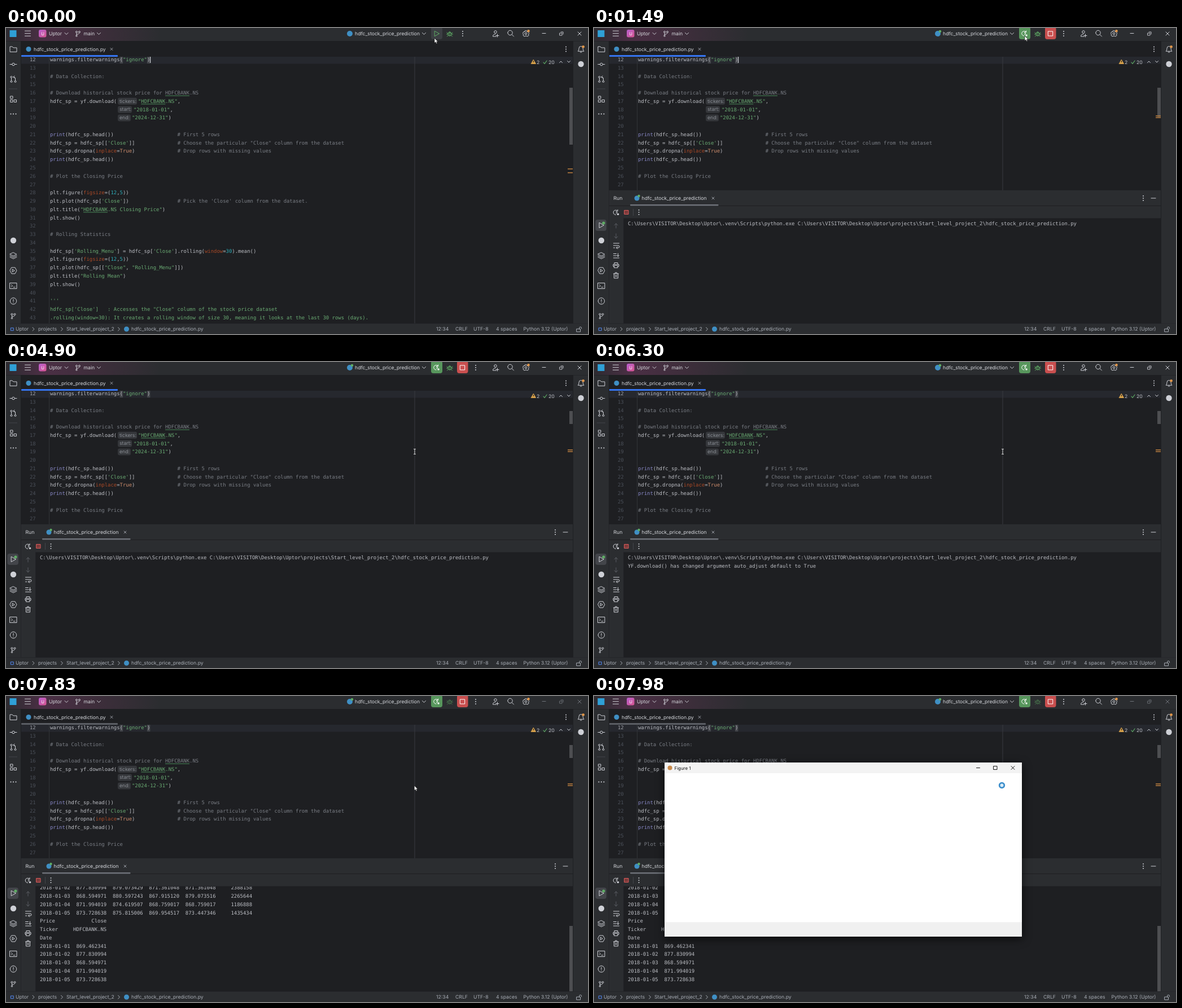
Write an HTML page that moves like this. It is 1031 px wide and 543 px high and loops after 8 s.

```html
<!DOCTYPE html>
<html lang="en">
<head>
<meta charset="utf-8">
<title>Editor run</title>
<style>
  html, body { margin: 0; width: 100%; height: 100%; overflow: hidden; background: #1e1f22; }
  svg { display: block; width: 100vw; height: 100vh; }
  text { font: 8.7px Inter, sans-serif; white-space: pre; text-rendering: geometricPrecision; }
  .mono { font: 8.93px "DejaVu Sans Mono", monospace; }
</style>
</head>
<body>
<svg id="stage" viewBox="0 0 1031 543" xmlns="http://www.w3.org/2000/svg"></svg>
<script>
const LOOP = 8000, COL = 5.376, ROW = 14.77;
const PANEL = '#2b2d30', EDITOR = '#1e1f22', ICON = '#ced0d6', TEXT = '#d5d7dc', DIM = '#6f737a';
const GREEN = '#57965c', ORANGE = '#e0964a', PYTHON = '#3f8fc4';

// Drawing helpers; all return SVG markup.
const rect = (x, y, w, h, fill, more = '') => `<rect x="${x}" y="${y}" width="${w}" height="${h}" fill="${fill}" ${more}/>`;
const dot = (x, y, r, fill) => `<circle cx="${x}" cy="${y}" r="${r}" fill="${fill}"/>`;
const label = (x, y, s, fill = TEXT, more = '') => `<text x="${x}" y="${y}" fill="${fill}" ${more}>${s}</text>`;
const mono = (x, y, s, fill = '#bcbec4') => label(x, y, s, fill, 'class="mono"');
const icon = (x, y, d, color = ICON, fill = 'none', width = 1) =>
  `<path transform="translate(${x} ${y})" d="${d}" stroke="${color}" fill="${fill}" stroke-width="${width}" stroke-linecap="round" stroke-linejoin="round"/>`;
const ring = (x, y, r) => `M${x - r} ${y}a${r} ${r} 0 1 0 ${2 * r} 0a${r} ${r} 0 1 0 ${-2 * r} 0`;
const dots = (x, y) => [-4, 0, 4].map(d => dot(x, y + d, 1, ICON)).join('');
const during = (from, to, body) => `<g data-from="${from}" data-to="${to}">${body}</g>`;

const CHEVRON = 'M-3-1.5L0 1.5 3-1.5', NEXT = 'M-1.5-3L1.5 0-1.5 3', CROSS = 'M-2-2L2 2M2-2L-2 2';
const BIGCROSS = 'M-3-3L3 3M3-3L-3 3', PLAY = 'M-3.5-4.5L4.5 0-3.5 4.5z', BOX = 'M-3-3h6v6h-6z';
const BRANCH = ring(-2.5, -3, 1.5) + ring(2.5, -3, 1.5) + ring(-2.5, 4, 1.2) + 'M-2.5-1.5V2.8M2.5-1.5Q2.5 1-2.5 1.5';
const RERUN = 'M2-3.5A4.2 4.2 0 1 0-.5 4M3-5V-2.5H.5M0-1.5L2.5 0 0 1.5';
const BUG = ring(0, 1, 3) + 'M-2-2Q0-5 2-2M0-1.5V4M-5-2L-3 0M5-2L3 0M-5.5 1h2M5.5 1h-2M-4.5 5L-2.5 3M4.5 5L2.5 3';

const CODE = `warnings.filterwarnings("ignore")

# Data Collection:

# Download historical stock price for HDFCBANK.NS
hdfc_sp = yf.download(



print(hdfc_sp.head())                     # First 5 rows
hdfc_sp = hdfc_sp[['Close']]              # Choose the particular "Close" column from the dataset
hdfc_sp.dropna(inplace=True)              # Drop rows with missing values
print(hdfc_sp.head())

# Plot the Closing Price

plt.figure(figsize=(12,5))
plt.plot(hdfc_sp['Close'])                # Pick the 'Close' column from the dataset.
plt.title("HDFCBANK.NS Closing Price")
plt.show()

# Rolling Statistics

hdfc_sp['Rolling_Menu'] = hdfc_sp['Close'].rolling(window=30).mean()
plt.figure(figsize=(12,5))
plt.plot(hdfc_sp[["Close", "Rolling_Menu"]])
plt.title("Rolling Mean")
plt.show()

'''
hdfc_sp['Close']   : Accesses the "Close" column of the stock price dataset
.rolling(window=30): It creates a rolling window of size 30, meaning it looks at the last 30 rows (days).`.split('\n');

const TOKEN = /(#.*)|("[^"]*"|'[^']*')|\b(figsize|inplace|window)(?==)|\b(True)\b|\b(print)\b|\b(\d+)\b/g;
const TOKEN_COLORS = ['#7a7e85', '#6aab73', '#aa4926', '#cf8e6d', '#8888c6', '#2aacb8'];
const paint = s => s.replace(TOKEN, (word, ...groups) =>
  `<tspan fill="${TOKEN_COLORS[groups.findIndex(Boolean)]}">${word}</tspan>`);

const baseline = line => 59 + (line - 12) * ROW;
const hint = (line, w, name, next, code) =>
  rect(198, baseline(line) - 9, w, 12.2, '#35373b', 'rx="3"') +
  label(201, baseline(line) - .2, name, '#8b8f96') + mono(next, baseline(line), paint(code));
const typo = (x, line) => rect(x, baseline(line) + 1.6, 8 * COL, 1, '#4b8a5a');

function editor() {
  const lines = CODE.map((s, i) => {
    const n = i + 12;
    return mono(42, baseline(n), n, n == 12 ? '#a1a3ab' : '#4b5059') +
      mono(78, baseline(n), n > 40 ? s : paint(s), n > 40 ? '#6aab73' : undefined);
  }).join('');
  return rect(26, 23, 978, 501, EDITOR) + rect(27, 51, 977, 12.5, '#26282e') +
    rect(76, 51, 1, 473, '#313438') + rect(723.5, 51, 1, 473, '#393b40') +
    rect(201.7, 51, COL, 12, '#43454a') + rect(250, 51, COL, 12, '#43454a') + lines +
    hint(17, 34, 'tickers:', 234, '"HDFCBANK.NS",') +
    hint(18, 25, 'start:', 226, '"2018-01-01",') +
    hint(19, 23, 'end:', 223, '"2024-12-31")') +
    typo(282, 16) + typo(239.3, 17) + typo(137, 30) +
    `<rect id="caret" x="255" y="51" width="1.2" height="11" fill="${ICON}"/>` +
    icon(934.5, 60, 'M0-3.5L4 3.5H-4z', '#d6a04a', '#d6a04a') + rect(934, 58, 1, 3, EDITOR) +
    label(940, 63.5, '2', '#bcbec4') + icon(955, 61, 'M-3 0L-1 2.5 3-3', '#5fad65', 'none', 1.2) +
    label(961, 63.5, '20', '#bcbec4') + icon(983, 60, 'M-2.5 1.5L0-1 2.5 1.5') + icon(997, 60, 'M-2.5-1.5L0 1 2.5-1.5') +
    dot(40, 37.5, 4.5, PYTHON) + label(49, 41, 'hdfc_stock_price_prediction.py') + icon(187, 37.5, CROSS, '#9da0a8') +
    during(0, 7830, rect(27, 48, 171, 3, '#3574f0', 'rx="1"')) +
    during(7830, LOOP, rect(27, 48, 171, 3, '#5a5d63', 'rx="1"')) + dots(992, 37.5);
}

const scrollbar = (from, to, y, h, marks) => during(from, to,
  rect(998, y, 6, h, '#4d4e51') + marks.map(m => rect(995, m, 9, 1.6, '#b47a3e')).join(''));

function titleBar() {
  const controls = color => icon(786, 10, BUG, color == ICON ? '#5fad65' : '#466f4a') +
    icon(953, 9.5, 'M-3 0H3', color) + icon(984, 10, 'M-3-1h4v4h-4zM-1-3h4v4', color, 'none', .9) + icon(1016, 10, BIGCROSS, color);
  return `<defs><linearGradient id="tint" gradientUnits="userSpaceOnUse" x1="0" x2="275">
      <stop stop-color="#2d2b30"/><stop offset=".24" stop-color="#4b2f45"/><stop offset=".55" stop-color="#3f2e3c"/><stop offset="1" stop-color="${PANEL}"/>
    </linearGradient><linearGradient id="badge" x2="1" y2="1"><stop stop-color="#b75fd0"/><stop offset="1" stop-color="#d8568f"/></linearGradient></defs>` +
    rect(0, 0, 1031, 23, PANEL) + rect(0, 0, 275, 23, 'url(#tint)') + rect(0, 23, 1031, .7, EDITOR) +
    rect(6.5, 4, 12, 12, '#2f9fd6') + icon(38.5, 9.7, 'M-5-4.5H5M-5 0H5M-5 4.5H5') +
    rect(58, 3, 13.5, 13.5, 'url(#badge)', 'rx="3"') + label(62.3, 12.6, 'U', '#fff', 'style="font-size:7.6px"') +
    label(76, 13, 'Uptor') + icon(107, 10, CHEVRON) + icon(127.5, 10, BRANCH, ICON, 'none', .9) +
    label(137.5, 13, 'main') + icon(164.5, 10, CHEVRON) +
    dot(609, 10, 5, PYTHON) + label(618, 13, 'hdfc_stock_price_prediction') + icon(740.5, 10, CHEVRON) +
    during(0, 1490, rect(753, -2, 20, 22, '#3c3f43', 'rx="4"') + icon(763, 10, PLAY, '#5fad65') + dots(809, 10)) +
    during(1490, LOOP, dot(613, 6, 2.3, '#5fad65') + rect(753, -2, 20, 22, GREEN, 'rx="4"') +
      icon(762.5, 10, RERUN, '#fff') + dot(766, 13, 1.8, '#e4efe5') +
      rect(799, -2, 19.5, 22, '#c94f4f', 'rx="4"') + icon(808.7, 10, 'M-4-4h8v8h-8z', '#fff') + dots(832, 10)) +
    during(0, 7830, controls(ICON)) + during(7830, LOOP, controls(DIM)) +
    icon(867.5, 10, ring(-.5, -3, 2.3) + 'M1 5H-5Q-5 .8-.5.8M3 1v5M.5 3.5h5') +
    icon(894, 9.5, ring(-1, -1, 4.2) + 'M2 2L5.5 5.5') +
    icon(921, 10, ring(0, 0, 1.8) + 'M-1.5-5h3l.6 1.7 2.3.3 1.2 2.3L4.5 1l.6 2-2 2-2-.8H-1l-2 .8-2-2 .5-2-1-1.8 1.2-2.3 2.2-.3z') + dot(925.5, 5.2, 2.3, ORANGE);
}

function sideBars() {
  return rect(0, 23.5, 26, 501, PANEL) + rect(1005, 23.5, 26, 501, PANEL) +
    icon(13, 37.5, 'M-6 4.5V-4.5H-2L0-2.5H6V4.5z') +
    icon(13, 64.5, ring(0, 0, 2.3) + 'M-6 0h3.5M2.5 0H6') +
    icon(13, 91, ring(-3.5, -4, 1.5) + ring(-3.5, 4, 1.5) + ring(3.5, 4, 1.5) + 'M-3.5-2.3V2.3M3.5 2.3V-2Q3.5-4 0-4M2-6L0-4 2-2') +
    rect(5, 107.5, 15, 1, '#43454a') +
    icon(13, 126, 'M-5-5h4v4h-4zM-5 1.5h4v4h-4zM1.5 1.5h4v4h-4z') +
    [8.5, 13, 17.5].map(x => dot(x, 152.5, 1.1, ICON)).join('') +
    dot(13, 377, 5.2, ICON) +
    icon(13, 404, 'M0-5.5L6-2.5 0 .5-6-2.5zM-6 0L0 3 6 0M-6 2.5L0 5.5 6 2.5') +
    icon(13, 430.5, 'M-3-5.5H3L6 0 3 5.5H-3L-6 0zM-1.5-2.3L2.3 0-1.5 2.3z') +
    icon(13, 457.5, 'M-6-5H6V5H-6zM-3.5-2L-1.5 0-3.5 2M0 2.5h3') +
    icon(13, 484.5, ring(0, 0, 5.7) + 'M0-3V.8M0 2.8V3') + icon(13, 511, BRANCH) +
    icon(1018.5, 37.5, 'M-5 3.5Q-3.5 2-3.5-1.5A3.5 3.5 0 0 1 3.5-1.5Q3.5 2 5 3.5zM-1.3 5.5H1.3') + dot(1022.5, 33.3, 2.4, ORANGE) +
    dot(1018.5, 64, 5.2, ICON);
}

function statusBar() {
  const gray = '#a8adb5';
  const items = [[17, 'Uptor'], [57, 'projects'], [107, 'Start_level_project_2'], [222, 'hdfc_stock_price_prediction.py'],
    [762, '12:34'], [796, 'CRLF'], [828, 'UTF-8'], [868, '4 spaces'], [916.5, 'Python 3.12 (Uptor)']];
  return rect(0, 524.5, 1031, 19, PANEL) + icon(11, 534.5, 'M-2.3-2.3h4.6v4.6h-4.6z', '#548af7') +
    items.map(([x, s]) => label(x, 537.3, s, gray)).join('') +
    [48.5, 99, 200].map(x => icon(x, 534.3, NEXT, gray)).join('') + dot(213.5, 534.3, 4.5, PYTHON) +
    icon(1015, 535, 'M-4-1H2.5V4H-4zM.5-1V-2.5A2 2 0 0 1 4.5-2.5V-1.5', gray);
}

const HOME = 'C:\\Users\\VISITOR\\Desktop\\Uptor\\';
const COMMAND = `${HOME}.venv\\Scripts\\python.exe ${HOME}projects\\Start_level_project_2\\hdfc_stock_price_prediction.py`;
const OUTPUT = `2018-01-02  877.830994  879.073429  871.361048  871.361048     2388158
2018-01-03  868.594971  880.597243  867.915120  879.073516     2265644
2018-01-04  871.994019  874.619507  868.759017  868.759017     1186888
2018-01-05  873.728638  875.815006  869.954517  873.447346     1435434
Price            Close
Ticker     HDFCBANK.NS
Date
2018-01-01  869.462341
2018-01-02  877.830994
2018-01-03  868.594971
2018-01-04  871.994019
2018-01-05  873.728638`.split('\n');

function runPanel() {
  const print = (y, lines) => lines.map((s, i) => mono(60, y + i * ROW, s)).join('');
  return during(1490, LOOP,
    rect(26.5, 288, 977.5, 50, PANEL) + rect(26.5, 338, 26, 186, PANEL) + rect(52.5, 338, 951.5, 186, EDITOR) +
    rect(26.5, 315, 977.5, 1, EDITOR) + rect(64, 313, 156.5, 2.5, DIM, 'rx="1"') +
    during(1490, 6300, print(350.3, [COMMAND])) +
    during(6300, 7750, print(350.3, [COMMAND, 'YF.download() has changed argument auto_adjust default to True'])) +
    during(7750, LOOP, print(343.3, OUTPUT) + rect(998, 408, 6, 116, '#4d4e51')) +
    rect(52.5, 316, 951.5, 22, PANEL) + rect(52.5, 337.5, 951.5, .8, EDITOR) +
    label(34.5, 305, 'Run', TEXT, 'font-weight="600"') + dot(76, 302, 4.5, PYTHON) + dot(79.5, 298, 2.2, '#5fad65') +
    label(84.5, 305, 'hdfc_stock_price_prediction') + icon(211, 302, CROSS, '#9da0a8') +
    dots(973, 302) + icon(991, 302, 'M-4 0H4') +
    icon(39, 327.5, RERUN) + dot(42.5, 330.5, 1.8, ICON) + icon(57.5, 327, 'M-3.5-3.5h7v7h-7z', '#db5c5c', '#7c3b3b') +
    rect(69, 321, 1, 12, '#43454a') + dots(79.5, 327) +
    icon(39, 351, 'M0 4V-4M-3-1L0-4 3-1', '#5a5d63') + icon(39, 369, 'M0-4V4M-3 1L0 4 3 1', '#5a5d63') +
    icon(39.5, 386, 'M-5-4H5M-5 0H3.5A2 2 0 0 1 3.5 4H0M2 2L0 4 2 6M-5 4h2.5') +
    icon(39.5, 404, 'M-5-3.5H0M-5 0H0M-5 4H5M3-4V1.5M1-.5L3 1.5 5-.5') +
    icon(39, 421, 'M-3-1.5V-4.5H3V-1.5M-3 2H-5V-1.5H5V2H3M-3 .5H3V4.5H-3z') +
    icon(39, 439, 'M-4.5-3H4.5M-1.5-3V-5H1.5V-3M-3.5-3V5H3.5V-3M-1-.5V2.5M1-.5V2.5') +
    rect(2.5, 340, 19.5, 20, '#43454a', 'rx="4"') + icon(13, 350, PLAY) + dot(17, 346, 2.6, '#5fad65'));
}

function figureWindow() {
  const frame = rect(0, 0, 633, 309, '#f3f3f3') + dot(9.5, 9.5, 4, '#c98a4b') + label(17.5, 12.9, 'Figure 1', '#111', 'style="font-size:7.9px"') +
    icon(555.5, 9.5, 'M-3 0H3', '#111') + icon(586, 9.5, BOX, '#111') + icon(617, 9.5, BIGCROSS, '#111');
  return during(7920, 7980, `<g transform="translate(125 120) scale(.953)" opacity=".69">${frame}</g>`) +
    during(7980, LOOP, `<g transform="translate(125 118)" style="filter:drop-shadow(0 4px 8px #000a)">${frame}` +
      rect(0, 19, 633, 264.5, '#fff') + rect(0, 283.5, 633, 25.5, '#f0f0f0') + '</g>');
}

const pointers = '<g id="arrow"><path d="M0 0V8.6L2 6.8 3.4 9.8 4.9 9.1 3.5 6.2H6.1z" fill="#fff" stroke="#111" stroke-width=".6"/></g>' +
  `<g id="beam">${icon(0, 0, 'M-1.5-4.5H1.5M0-4.5V4.5M-1.5 4.5H1.5', '#e8e8e8', 'none', .9)}</g>` +
  '<g id="busy"><circle r="4.3" fill="#d9ecf8" stroke="#3d8fcc" stroke-width="2.8"/></g>';

const stage = document.getElementById('stage');
stage.innerHTML = rect(0, 0, 1031, 543, EDITOR) + editor() +
  scrollbar(0, 1490, 106, 101, [249.3, 256]) + scrollbar(1490, 2100, 106, 52, [155.2, 158.2]) + scrollbar(2100, LOOP, 87, 23, [155.2, 158.2]) +
  titleBar() + sideBars() + runPanel() + statusBar() + figureWindow() + pointers;

const timed = [...stage.querySelectorAll('[data-from]')];
const show = (el, visible) => { el.style.display = visible ? '' : 'none'; };
const [caret, arrow, beam, busy] = ['caret', 'arrow', 'beam', 'busy'].map(id => document.getElementById(id));
const CARET_FLIPS = [490, 950, 1880, 2405, 2890, 3420, 3890, 4420, 4900, 5420, 5880, 6380, 6880, 7410, 7830];

// Share of a move done in equal time steps, eased at both ends.
function stepped(t, from, to, steps) {
  if (t < from) return 0;
  const p = Math.min(1, (Math.floor((t - from) / (to - from) * (steps - 1)) + 1) / steps);
  return p * p * (3 - 2 * p);
}

function pointer(t) {
  if (t >= 7920) return [busy, 722.5, 158.5];
  if (t >= 7830) return [arrow, 723.3, 159];
  if (t >= 1100 && t < 1350) return [busy, 762.5, 14];
  const a = stepped(t, 70, 300, 4), b = stepped(t, 2030, 2480, 7);
  const x = 759 + 4 * a - 39 * b, y = 18 - 4 * a + 145 * b;
  return [y > 50 ? beam : arrow, x, y];
}

function draw(now) {
  const t = now % LOOP;
  for (const el of timed) show(el, t >= el.dataset.from && t < el.dataset.to);
  show(caret, CARET_FLIPS.filter(f => f <= t).length % 2 == 0);
  const [shape, x, y] = pointer(t);
  for (const el of [arrow, beam, busy]) show(el, el == shape);
  shape.setAttribute('transform', `translate(${x} ${y})`);
  requestAnimationFrame(draw);
}
draw(performance.now());
</script>
</body>
</html>
```
